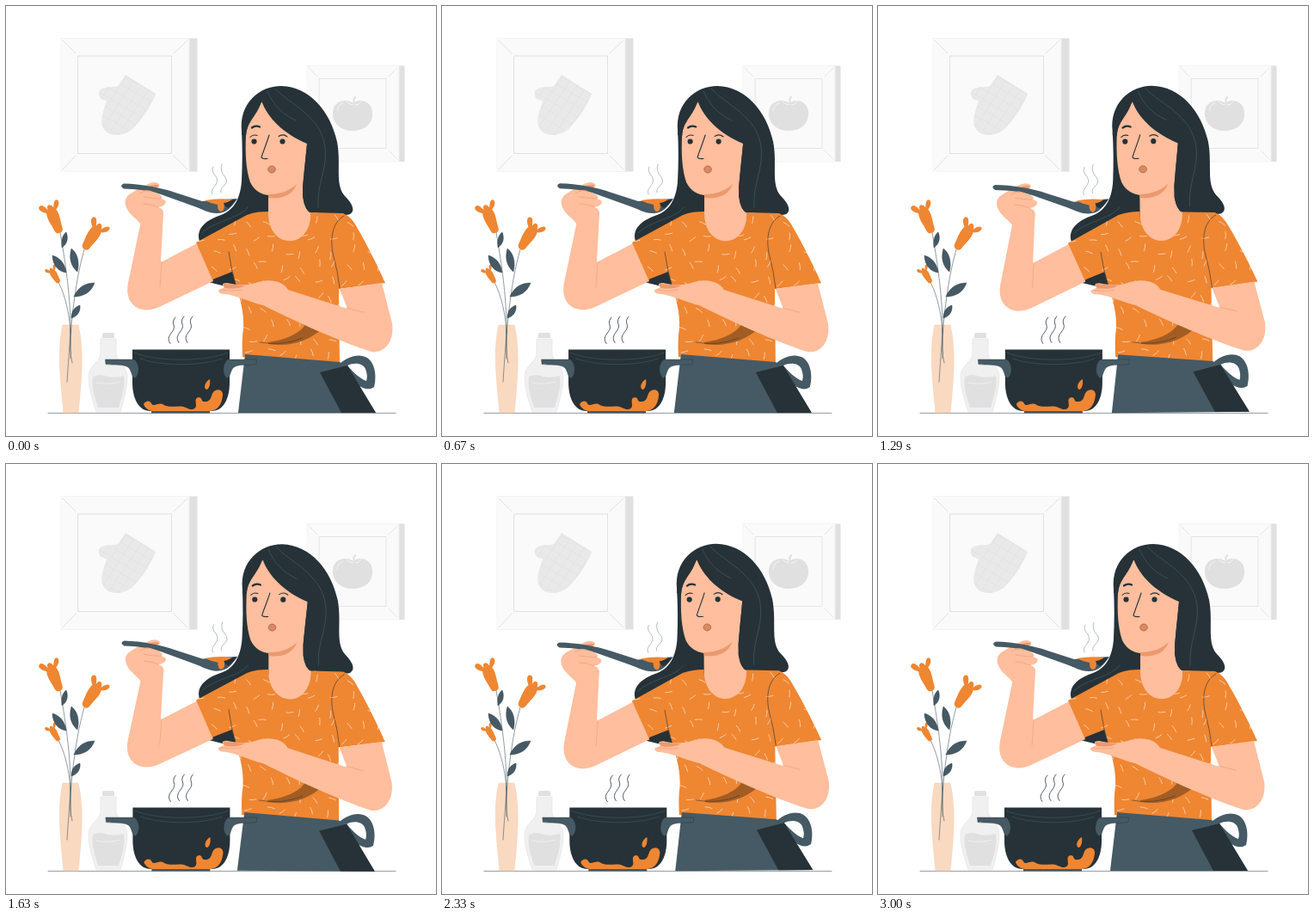
Write an HTML page that moves like this. It is 500 px wide and 500 px high and loops after 3040 ms.

```html
<!DOCTYPE html>
<html>
<head>
<meta charset="utf-8">
<style>
html, body { margin: 0; width: 100%; height: 100%; overflow: hidden; background: #fff }
svg { display: block; width: 100vw; height: 100vh }
.line { fill: none; stroke-linecap: round; stroke-linejoin: round }
.dark { fill: #263238 } .slate { fill: #455a64 } .skin { fill: #ffbe9d } .orange { fill: #ef8632 }
.ink { stroke: #263238 } .soft { stroke: #455a64 } .tan { stroke: #eb996e }
.pale { fill: #fafafa; stroke: #f0f0f0; stroke-width: .7 } .grey { fill: #e0e0e0 } .edge { stroke: #e0e0e0 }
</style>
</head>
<body>
<svg viewBox="0 0 500 500">
<defs>
  <path id="shirt" d="M305 239C296 239 288 240 280 243L221 275L240 318L263 309L268 327C273 343 277 358 276 375Q274 388 275 408L388 417L387 329L441 322C432 302 420 278 409 259Q402 245 392 241L354 240C356 284 304 285 305 239Z"/>
  <clipPath id="cloth"><use href="#shirt"/></clipPath>
  <path id="mitt" d="M139 80L174 102C168 118 158 132 147 143C136 153 116 153 112 139C109 130 115 120 117 110C108 110 105 101 110 97C117 92 128 96 131 92Z"/>
  <clipPath id="quilt"><use href="#mitt"/></clipPath>
  <path id="bloom" d="M-5 -4Q-5 2 0 2Q5 2 5 -4C6 -13 8 -19 6 -25C10 -27 13 -31 12 -34C10 -37 7 -35 4 -28Q3 -33 0 -33Q-3 -33 -3 -28C-6 -35 -9 -38 -12 -34C-13 -31 -9 -27 -6 -25C-8 -18 -6 -11 -5 -4Z"/>
</defs>

<g id="wall">
  <path class="grey" d="M213 37.500h9.500v155h-9.500zM457 69.500h6.500v111.500h-6.500z"/>
  <path class="pale" d="M64 37.500h149v155h-149zM350 69.500h107v111.500h-107z"/>
  <path class="line edge" d="M84 58H192.500V171.500H84ZM66 40L81 55M211 40L195 55M66 190L81 174M211 190L195 174"/>
  <path class="line edge" stroke-width=".8" d="M364.500 84.500H442V165.500H364.500ZM352 72L362 82M455 72L445 82M352 178L362 168M455 178L445 168"/>
  <use href="#mitt" fill="#e9e9e9"/>
  <path id="grid" class="line" clip-path="url(#quilt)" stroke="#e0e0e0" stroke-width=".6"/>
  <path class="grey" d="M404 113C410 107 425 110 426 123C427 138 416 145 403 145C390 145 379 137 380 123C381 110 396 107 404 113Z"/>
  <path class="line" stroke="#f5f5f5" d="M385 122Q386 115 392 113M396 111Q400 116 405 114Q409 117 413 111"/>
  <path class="line edge" stroke-width="2" d="M405 114Q403 109 406 106"/>
</g>

<path class="line ink" stroke-width=".5" d="M49 473.400H453"/>

<g id="vase">
  <path fill="#fad9c1" stroke="#f3cdb1" stroke-width=".5" d="M66 371H84C90 397 89 425 84 473H67C62 425 60 397 66 371Z"/>
  <path class="line soft" stroke-width=".6" d="M63 263C70 305 77 345 75 410M91 283C79 325 75 375 71 437M61 321C69 337 74 358 75 380M75 375Q73 400 77 415"/>
  <use href="#bloom" class="orange" transform="translate(62 262) rotate(-22)"/>
  <use href="#bloom" class="orange" transform="translate(92 281) rotate(33)"/>
  <use href="#bloom" class="orange" transform="translate(61 321) rotate(-31) scale(.57)"/>
  <path class="slate ink" stroke-width=".4" d="M65 281C64 271 66 266 70 263C73 270 71 277 65 281ZM54 290C64 293 69 301 70 310C61 309 54 301 54 290ZM76 282C83 287 86 298 83 309C75 302 73 293 76 282ZM79 338C84 326 93 322 103 322C99 333 90 338 79 338ZM76 363C76 354 80 350 86 348C87 355 83 361 76 363Z"/>
</g>

<g id="bottle">
  <path fill="#f0f0f0" stroke="#e3e3e3" stroke-width=".7" d="M110 387H128V405C130 415 140 418 141 430C141 446 136 460 133 472H105C101 460 96 445 96 430C97 418 108 415 110 405Z"/>
  <path class="grey" d="M112 382Q112 380 114 380H124Q126 380 126 382V386H112ZM101 431Q110 427 118 431Q128 433 137 430C139 445 134 456 131 467H107C104 456 99 444 101 431Z"/>
  <path class="line" stroke="#f0f0f0" d="M105 438Q118 441 132 437"/>
</g>

<g id="woman">
  <path class="dark" d="M274 145C271 113 295 93 320 93C353 94 377 122 385 158C390 185 382 207 394 221C402 229 407 238 400 242C393 245 370 240 345 240L300 246L226 276C219 260 232 249 250 243C267 237 273 220 274 203C275 183 275 165 274 145Z"/>
  <path class="dark" d="M235 321L262 305L272 330Z"/>
  <path class="skin" d="M297 111C292 128 281 133 279 150C278 172 279 190 284 205C289 215 297 219 305 220V243C304 290 355 290 354 241Q347 236 346 225L345 210L350 160Z"/>
  <path fill="#eb996e" d="M305 219C320 219 331 214 338 207C333 221 319 225 305 223Z"/>
  <path class="dark" d="M297 110C304 130 322 148 350 160C348 183 345 203 345 222Q347 237 356 241L376 230L374 140L335 103L305 96Z"/>
  <path class="dark" d="M274 150C275 122 292 103 310 100L297 112C290 126 280 134 279 151Z"/>
  <path class="line soft" stroke-width=".7" d="M304 99C310 114 321 126 337 133M313 96C330 115 366 127 371 164C374 190 361 207 363 234M228 264C241 250 273 247 281 234"/>

  <circle class="dark" cx="288.500" cy="157.500" r="3.100"/>
  <circle class="dark" cx="321.500" cy="157.500" r="3.100"/>
  <path class="line ink" stroke-width="1.100" d="M284 152.500Q287 149 292 150.500M317 151.500Q322 148 327 152M306 150C303 160 299 169 297 176Q298 178 304 177.500"/>
  <path class="line ink" stroke-width="2.300" d="M286 141.500Q290 138.500 295 140.500"/>
  <ellipse cx="309" cy="190" rx="4.300" ry="4" fill="#d98964" stroke="#a4583b" stroke-width=".7"/>

  <path class="skin" d="M157 250L142 322C137 347 156 360 178 350L241 320L226 274L180 298L183 240L170 232Z"/>
  <path class="line tan" stroke-width=".5" d="M181 297L179 327"/>

  <use href="#shirt" class="orange"/>
  <path id="flecks" class="line" clip-path="url(#cloth)" stroke="#fbdcc0" stroke-width=".8"/>
  <path class="line ink" stroke-width=".6" d="M259 286Q262 308 268 327M393 244C379 252 377 270 380 287Q386 309 388 328"/>
  <path fill="#a25d24" d="M305 391C327 388 346 379 350 366L369 374C354 389 330 397 305 393Z"/>
  <path class="line ink" stroke-width=".5" d="M295 391Q321 396 345 386"/>

  <path class="skin" d="M388 329L437 322L449 369C452 389 441 404 425 402C390 391 335 366 299 348C285 345 270 337 255 335C246 335 245 330 250 329Q256 327 252 325Q251 322 257 322C275 326 284 324 293 321C309 317 322 320 328 330L397 352Z"/>
  <path fill="#eb996e" d="M254 323L278 325Q270 330 255 328Q251 325 254 323Z"/>
  <path class="line tan" stroke-width=".6" d="M250 330Q265 332 274 330M396 351L416 356"/>

  <path class="skin" d="M157 254C150 245 139 240 138.500 228C139 219 148 217 155 212L165 207Q173 203 178 207Q180 210 170 216L178 219Q184 222 180 224Q188 226 185 230Q183 233 177 234Q184 236 183 242L181 254Z"/>
  <path fill="#eb996e" d="M164 211Q172 206 178 209L170 215Z"/>
  <path class="slate" d="M137 206.500C157 207 180 211 197 217L228 227Q250 225 269 224C262 234 257 241 245 241C235 241 228 236 219 233L180 219C165 214 151 213 137 212.500Q131 209 137 206.500Z"/>
  <path class="dark" d="M253 226L268 225Q263 232 258 235Q252 232 253 226Z"/>
  <path class="orange" d="M231 226Q247 223 263 225Q257 229 253 229C255 234 253 239 250 239Q246 239 246 231Q239 230 231 226Z"/>
  <path class="skin" d="M154 217Q163 212 171 216Q179 218 180 222L163 219Z"/>
  <path class="line tan" stroke-width=".6" d="M160 222Q170 224 180 224M160 230Q169 230 177 234M155 218Q163 213 169 216"/>
  <path class="line" stroke="#87939a" stroke-width=".6" d="M240 219C236 211 250 208 244 198Q238 192 241 187M250 217C247 210 261 208 255 199Q248 192 251 184"/>

  <path class="slate" fill-rule="evenodd" d="M387 417C396 408 410 403 420 409C430 416 431 432 428 443Q423 447 415 444C405 440 398 430 388 424ZM397 418C405 414 415 415 418 422Q421 430 419 436C411 433 404 426 397 418Z"/>
  <path class="slate" d="M278 405L388 414L398 421L430 473H270Z"/>
  <path class="dark" d="M365 426L397 418L430 473H390Z"/>
</g>

<g id="pot">
  <path class="slate" d="M169 469H237V473.500H169Z"/>
  <path class="dark" d="M147 399.500H260V438C260 456 253 471 239 471H168C154 471 147 456 147 438Z"/>
  <path class="line soft" stroke-width=".6" d="M149 403C174 414 233 414 258 403M156 410C180 419 227 419 251 410"/>
  <path class="orange" d="M160 463C162 459 167 458 169 462C171 467 176 461 182 463C191 469 201 463 209 467C215 470 220 470 221 465C221 460 219 456 224 455C229 455 226 461 232 460C239 460 238 453 241 449C245 444 253 446 252 453C251 462 247 470 238 471H170C164 470 161 466 160 463ZM237 434C238 440 236 446 233 446C229 444 232 436 237 434Z"/>
  <g class="slate ink" stroke-width=".4">
    <path id="grip" d="M115.500 411H149C155 415 156 427 151 432C146 435 147 424 142 420C136 416 125 418 116 416.500Z"/>
    <use href="#grip" transform="translate(407 0) scale(-1 1)"/>
  </g>
  <g class="line ink" stroke-width=".8">
    <path id="wisp" d="M191 392.500C184 383 198 379 195 371Q193 366 197 362"/>
    <use href="#wisp" x="10" y="-1"/>
    <use href="#wisp" x="20" y="-1"/>
  </g>
</g>
</svg>
<script>
const $ = id => document.getElementById(id);

// Confetti print: jittered grid of short strokes
let seed = 11;
const rnd = () => (seed = seed * 16807 % 2147483647) / 2147483647;
let flecks = '';
for (let y = 246; y < 416; y += 17)
  for (let x = 222; x < 442; x += 19) {
    const a = rnd() * Math.PI, dx = 4 * Math.cos(a), dy = 4 * Math.sin(a);
    const px = x + rnd() * 13, py = y + rnd() * 11;
    flecks += `M${px - dx} ${py - dy}Q${px + dy * .2} ${py - dx * .2} ${px + dx} ${py + dy}`;
  }
$('flecks').setAttribute('d', flecks);

// Quilting follows the two sides of the mitt
let grid = '';
for (let i = -72; i <= 72; i += 12)
  grid += `M${102 + i} 175l80 -120M82 ${85 + i}l120 70`;
$('grid').setAttribute('d', grid);

const SHAKE = [0, -1, 2, -4, 4, -4, 4, -4, 2, -1, 0];
const shake = p => {
  const i = Math.floor(p * 10);
  return SHAKE[i] + (SHAKE[i + 1] - SHAKE[i]) * (p * 10 - i);
};
// Triangle wave: 0, 1, 0, -1 over one turn
const sway = p => 1 - 4 * Math.abs((p + .25) % 1 - .5);

const start = performance.now();
function draw(now) {
  const t = (Math.max(0, now - start) % 3040 + 30) % 3000;
  $('woman').setAttribute('transform', `rotate(${sway(t / 1500 % 1) - .08} 292 283)`);
  $('pot').setAttribute('transform', `translate(${shake(t / 3000) + .1} 0)`);
  requestAnimationFrame(draw);
}
draw(start);
</script>
</body>
</html>
```
